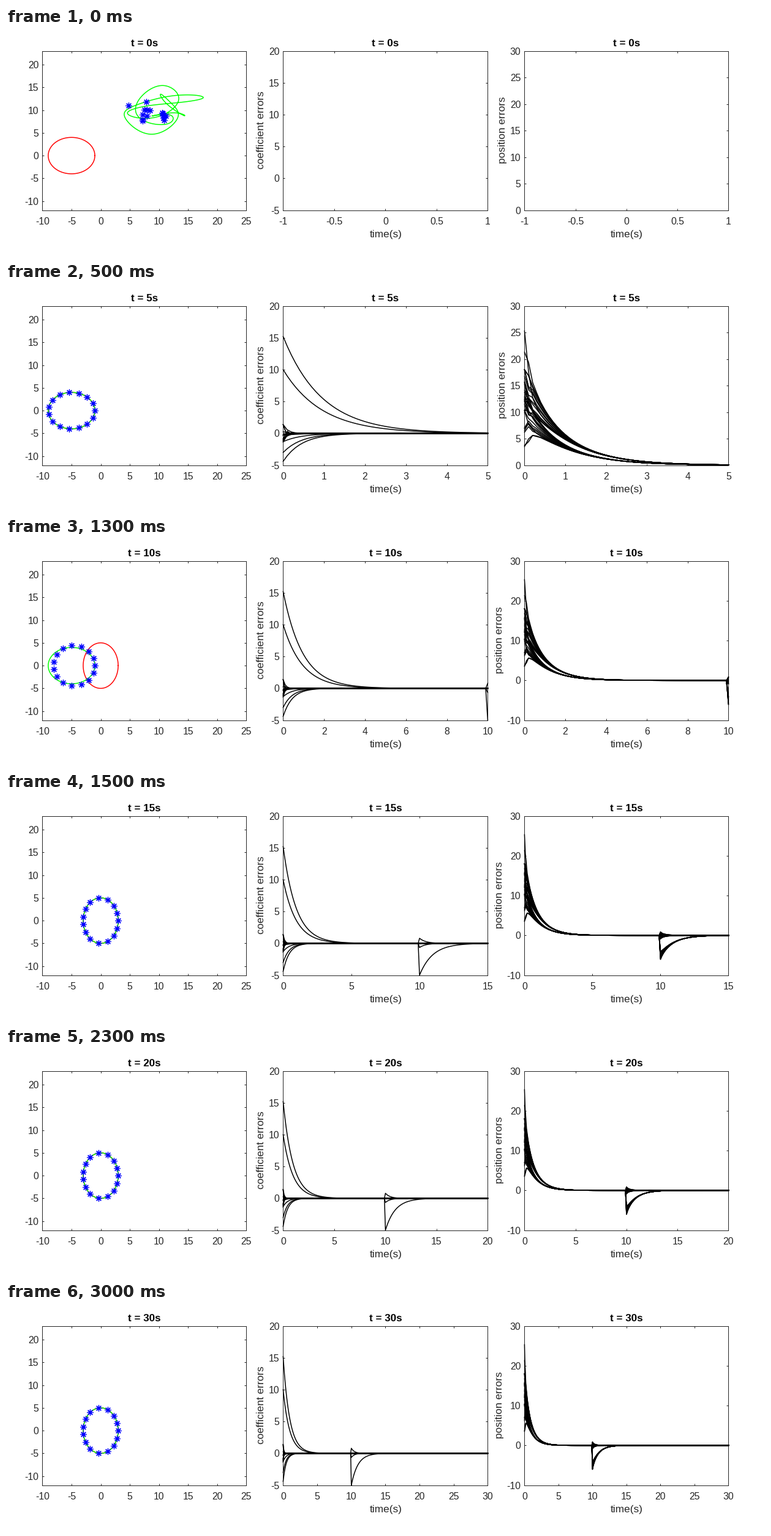
Write a matplotlib script that moves like this. It is 1239x372 px and loops after 3500 ms.

```python
import matplotlib.pyplot as plt
import numpy as np
from matplotlib.animation import FuncAnimation

W, H, DPI = 1239, 372, 64
TOP, BOTTOM = 37.6, 298.6
GRAY = "#262626"


def pt(px):
    return px * 72 / DPI


plt.rcParams.update({"font.family": "Liberation Sans",
                     "axes.unicode_minus": False,
                     "path.simplify": False})
fig = plt.figure(figsize=(W / DPI, H / DPI), dpi=DPI, facecolor="white")


def label(x, y, text, **kw):
    style = dict(size=pt(17.2), ha="center", va="baseline", color=GRAY)
    return fig.text(x / W, 1 - y / H, text, **{**style, **kw})


def panel(left, right, ylim):
    ax = fig.add_axes([left / W, 1 - BOTTOM / H,
                       (right - left) / W, (BOTTOM - TOP) / H])
    ax.set_ylim(ylim)
    ax.tick_params(direction="in", top=True, right=True, length=pt(3.4),
                   width=pt(1), color=GRAY, labelcolor=GRAY,
                   labelsize=pt(15.8))
    ax.tick_params(axis="x", pad=pt(11))
    ax.tick_params(axis="y", pad=pt(6))
    for spine in ax.spines.values():
        spine.set(linewidth=pt(1), color=GRAY)
    title = label((left + right) / 2, 30, "", size=pt(17), weight="bold",
                  color="black")
    return ax, title


def side_label(x, text):
    return label(x, 167, text, rotation=90, rotation_mode="anchor")


def ellipse(cx, cy, a, b, n=400):
    th = np.linspace(0, 2 * np.pi, n)
    return np.array([cx + a * np.cos(th), cy + b * np.sin(th)])


def spaced(curve, n):
    """n points at equal arc length along a closed curve."""
    s = np.r_[0, np.cumsum(np.hypot(*np.diff(curve)))]
    at = np.arange(n) * s[-1] / n
    return [np.interp(at, s, c) for c in curve]


def closed_spline(keys, n=20):
    """Periodic cubic spline through complex key points."""
    w = 2 * np.pi * np.fft.fftfreq(len(keys))
    m = np.fft.ifft(np.fft.fft(keys) * 6j * np.sin(w) / (4 + 2 * np.cos(w)))
    p, q, mq = keys[:, None], np.roll(keys, -1)[:, None], np.roll(m, -1)[:, None]
    u = np.arange(n) / n
    v = 1 - u
    z = (p * v * v * (1 + 2 * u) + q * u * u * (1 + 2 * v)
         + u * v * (m[:, None] * v - mq * u)).ravel()
    z = np.append(z, z[0])
    return z.real, z.imag


plane, title1 = panel(59.4, 392.4, (-12, 23))
coef, title2 = panel(452.4, 786.4, (-5, 20))
pos, title3 = panel(846.4, 1179.4, (0, 30))
titles = title1, title2, title3
plane.set(xlim=(-10, 25), xticks=range(-10, 26, 5), yticks=range(-10, 21, 5))
coef.set_yticks(range(-5, 21, 5))
label(620, 343, "time(s)")
label(1013.3, 343, "time(s)")
side_label(421, "coefficient errors")
pos_label = side_label(815.5, "position errors")

N = 15
rng = np.random.default_rng(4)
circle, oval = (-5, 0, 4, 4), (0, 0, 3, 5)
halfway = (-4.53, 0, 3.53, 4.47)

# turning points of the tangled first shape
knot = closed_spline(np.array([
    14.3 + 8.8j, 11.4 + 11.3j, 10.3 + 13.5j, 12.2 + 11.4j, 13.1 + 8j,
    8.6 + 4.7j, 4.2 + 8.3j, 5.9 + 11j, 11.1 + 12.9j, 15.9 + 13.3j,
    17.5 + 12.6j, 13.7 + 11.7j, 7.9 + 10.9j, 4.6 + 9.4j, 7.1 + 8.2j,
    11.1 + 9.2j, 13.4 + 12.7j, 10.7 + 15.4j, 7 + 13j, 6.1 + 9.3j,
    8.6 + 7.1j, 11.9 + 7.2j, 11.7 + 9j, 8.8 + 8.7j, 12.7 + 9.4j]))

# two clusters of robots and two strays
swarm = np.array([7.8 + 2.8 * (np.arange(N) % 2) + rng.normal(0, 0.4, N),
                  rng.uniform(7.3, 10.2, N)])
swarm[:, :2] = (4.8, 7.8), (11, 11.8)

# Fourier coefficient errors: rows x, y; columns 1, cos, sin, cos 2, ...
theta = 2 * np.pi * np.arange(N) / N
basis = np.array([np.ones(N)] + [f(h * theta) for h in (1, 2, 3, 4)
                                 for f in (np.cos, np.sin)])
rate = np.repeat([0.9, 0.8, 0.4, -0.3, 0.2], [1, 2, 2, 2, 2])
first = np.clip(rng.normal(0, 1.4, (2, 9)), -2.4, 2.9)
first[:, :3] = (15.2, -4.4, -0.3), (10, -1.3, -3)
second = np.zeros((2, 9))
second[0, :2] = -5, 0.8
second[1, 2] = -0.65

# the robots' own lag behind the shape dies out fastest
start = np.clip(first @ basis + rng.normal(0, 1.6, (2, N)), 6.2, 18)
start[0, [3, 8]] = 25.3, 21.3
start[1, np.argsort((first * rate ** 2 @ basis)[1])[:2]] = 3.5, 3.7
lag_a = start - first @ basis
lag_b = 0.25 * np.array([np.cos(theta), -np.sin(theta)])


def decay(amps, lag, steps):
    k = np.arange(steps)[:, None, None]
    modes = amps * rate ** k
    return modes, modes @ basis + lag * 0.35 ** k


def history(t):
    """Errors every 0.1 s up to time t; the goal changes at 10 s."""
    n = 10 * t + 1
    parts = [decay(first, lag_a, min(n, 100))]
    if n > 100:
        parts.append(decay(second, lag_b, n - 100))
    return [np.concatenate(p).reshape(n, -1) for p in zip(*parts)]


def curves(ax, count, **kw):
    return [ax.plot([], [], lw=pt(1.5), **kw)[0] for _ in range(count)]


goal_line, = curves(plane, 1, color="red")
shape_line, = curves(plane, 1, color="lime")
stars, = plane.plot([], [], ls="", marker=(8, 2, 0), ms=pt(10.5),
                    mew=pt(1.25), color="blue")
coef_lines = curves(coef, 18, color="black", clip_on=False, zorder=3)
pos_lines = curves(pos, 2 * N, color="black", clip_on=False, zorder=3)


def update(frame):
    t = 5 * frame
    for title in titles:
        title.set_text(f"t = {t}s")

    goal = circle if t < 10 else oval
    goal_line.set_data(*ellipse(*goal))
    if t == 0:
        shape_line.set_data(*knot)
        stars.set_data(*swarm)
    else:
        shape_line.set_data(*ellipse(*(circle if t == 10 else goal)))
        stars.set_data(*spaced(ellipse(*(halfway if t == 10 else goal)), N))

    step = {0: 0.5, 5: 1, 10: 2}.get(t, 5)
    lo, hi = (-1, 1) if t == 0 else (0, t)
    ticks = np.arange(lo, hi + step / 2, step)
    for ax in (coef, pos):
        ax.set_xlim(lo, hi)
        ax.set_xticks(ticks, [f"{v:g}" for v in ticks])

    low, gap = (0, 5) if t < 10 else (-10, 10)
    pos.set_ylim(low, 30)
    pos.set_yticks(range(low, 31, gap))
    pos_label.set_x((815.5 if t < 10 else 810) / W)

    time = np.arange(10 * t + 1) / 10
    for lines, data in zip((coef_lines, pos_lines), history(t)):
        for line, y in zip(lines, data.T):
            line.set_data(time, y)
            line.set_visible(t > 0)


anim = FuncAnimation(fig, update, frames=7, interval=500, repeat=True,
                     repeat_delay=0)
plt.show()
```
